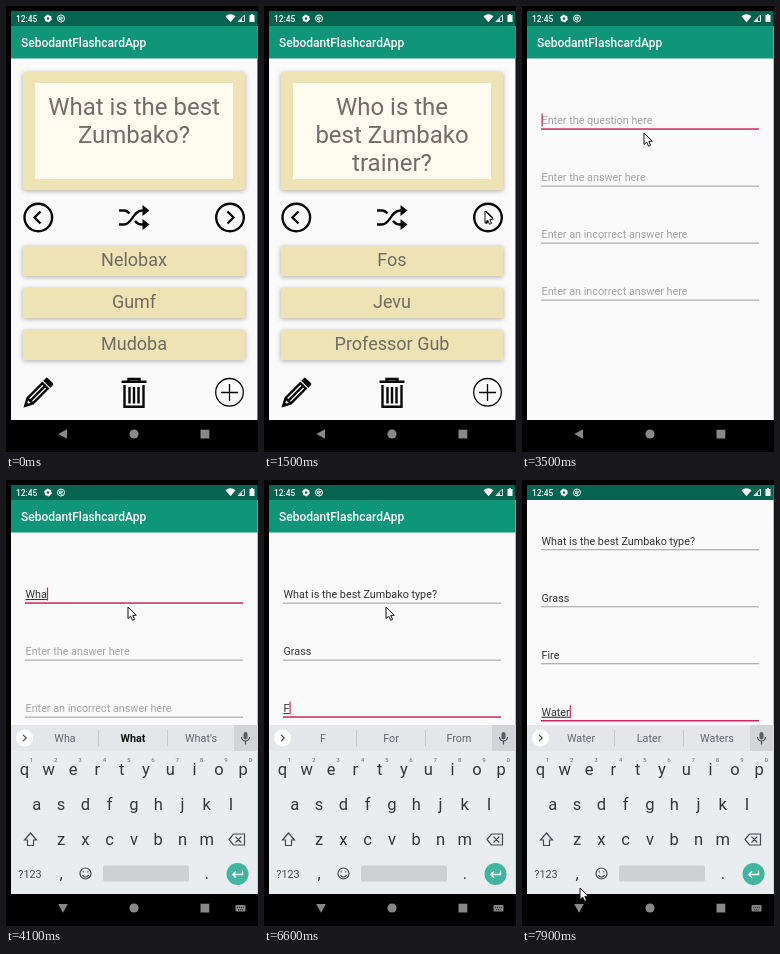
An HTML page for the animation above (8 s loop, 252x446 px).

```html
<!DOCTYPE html>
<html lang="en">
<head>
<meta charset="utf-8">
<title>Flashcards</title>
<style>
html, body { margin: 0; width: 100%; height: 100%; overflow: hidden; background: #000; }
svg { display: block; width: 252px; height: 446px; }
text { font-family: Roboto, sans-serif; white-space: pre; }
.mid { text-anchor: middle; }
.line { fill: none; stroke: #080808; stroke-width: 2.4; }
.card { fill: #ede3b5; filter: drop-shadow(0 1.5px 2.5px rgba(0, 0, 0, .32)); }
.question { font-size: 24px; fill: #716e69; }
.answer { font-size: 18px; fill: #716c60; }
.field { font-size: 10.8px; }
.key { font-size: 16.5px; fill: #33373a; }
.digit { font-size: 6.2px; fill: #666a6e; }
.glyph { fill: none; stroke: #45494d; stroke-width: 1.2; }
.nav { fill: #888; }
</style>
</head>
<body>
<svg viewBox="0 0 252 446">
  <defs>
    <clipPath id="screen"><rect x="5" y="5" width="246.500" height="409"/></clipPath>
    <g id="bar">
      <rect x="5" y="20" width="247" height="32.500" fill="#0f9577"/>
      <text x="15" y="41" font-size="12" font-weight="500" fill="#fff">SebodantFlashcardApp</text>
    </g>
  </defs>
  <rect width="252" height="446"/>
  <g clip-path="url(#screen)">
    <g id="deck">
      <rect x="5" y="20" width="247" height="394" fill="#fafafa"/>
      <use href="#bar"/>
      <rect class="card" x="17" y="66" width="222" height="118" rx="3"/>
      <rect x="29" y="77" width="198" height="96" fill="#fffbee"/>
      <g id="question"></g>
      <g id="answers"></g>
      <g class="line">
        <circle cx="32.300" cy="211.500" r="13.800"/>
        <path d="M34.500 205.500 28.500 211.500 34.500 217.500"/>
        <circle cx="224" cy="211.500" r="13.800"/>
        <path d="M221.500 205.500 227.500 211.500 221.500 217.500"/>
        <path d="M113 218.500h5c8 0 9-14 18-14h2M113 204.500h5c2 0 4 1.200 5.500 3M129 215c2 2.500 4 3.500 7 3.500h2"/>
      </g>
      <path d="M136.500 199l7 5.500-7 5.500zM136.500 213l7 5.500-7 5.500z" fill="#080808"/>
      <g transform="translate(32 387) rotate(-45)">
        <path class="line" d="M-18 0-11-3.800H10V3.800H-11ZM-11-3.800V3.800M-11 0H10"/>
        <path d="M-20 0-14.500-3V3ZM12.500-5H16q1.500 0 1.500 1.500V3.500Q17.500 5 16 5H12.500Z" fill="#080808"/>
      </g>
      <path class="line" d="M115.500 375.800H140.500M122.500 375V373H133.500V375M118.500 379V400.800H137.500V379M123.500 381V397.500M128 381V397.500M132.500 381V397.500"/>
      <g class="line" style="stroke-width:1.300">
        <circle cx="223.500" cy="386.300" r="13.800"/>
        <path d="M215 386.500H232M223.500 378V395"/>
      </g>
    </g>
    <g id="form">
      <g id="pan">
        <rect x="5" y="20" width="247" height="480" fill="#fafafa"/>
        <use href="#bar"/>
        <g id="fields"></g>
        <rect id="caret" width="1.200" height="13" fill="#d0265f"/>
      </g>
    </g>
    <g id="keyboard">
      <rect x="5" y="245" width="247" height="170" fill="#eaedf0"/>
      <rect x="5" y="245" width="247" height="26" fill="#e4e6e9"/>
      <rect x="228" y="245" width="24" height="26" fill="#d2d4d7"/>
      <path d="M92.500 250V266M161.500 250V266" stroke="#c6c9cc"/>
      <circle cx="18.500" cy="258" r="8.500" fill="#fff"/>
      <path class="glyph" d="M17 254.800 20.200 258 17 261.200"/>
      <rect x="237.500" y="252" width="4" height="7.500" rx="2" fill="#5b5f63"/>
      <path class="glyph" d="M235.500 257a4 4 0 0 0 8 0M239.500 261.500V264.500"/>
      <g id="words"></g>
      <g id="keys"></g>
      <path class="glyph" d="M24.500 353 18.500 360H21.500V365.500H27.500V360H30.500Z"/>
      <path class="glyph" d="M223 359.500 227.500 354H238.500V365H227.500ZM229.500 356.700 235.300 362.500M235.300 356.700 229.500 362.500"/>
      <circle class="glyph" cx="79.500" cy="393.500" r="5.500"/>
      <path class="glyph" d="M76.500 395a3.200 3.200 0 0 0 6 0M77.300 391.200V392.500M81.700 391.200V392.500"/>
      <rect x="97" y="385.500" width="86" height="16" rx="2" fill="#cdd0d3"/>
      <circle cx="231.500" cy="394" r="11" fill="#42b5a0"/>
      <path d="M236.500 390.500V394.500H227M230 391.300 226.800 394.500 230 397.700" fill="none" stroke="#fff" stroke-width="1.400"/>
    </g>
    <rect x="5" y="5" width="247" height="15" fill="#04644f"/>
    <g fill="#fff">
      <text x="10" y="15.500" font-size="8.400" font-weight="500">12:45</text>
      <circle cx="42" cy="12.500" r="2.300" fill="none" stroke="#fff" stroke-width="2"/>
      <circle cx="42" cy="12.500" r="3.400" fill="none" stroke="#fff" stroke-dasharray="1.780"/>
      <circle cx="55" cy="12.500" r="3.500" fill="none" stroke="#fff"/>
      <path d="M53.500 14V11.200H56.200V13H53.500L56.500 15" fill="none" stroke="#fff" stroke-width=".9"/>
      <path d="M219.500 10.200q5-4 10 0l-5 6zM236 12.200V16H232zM243.500 9h1.500V8h2v1h1.500v7h-5z"/>
      <path d="M238.500 9V15.500H232Z" fill="none" stroke="#fff" stroke-width=".9"/>
    </g>
  </g>
  <g class="nav">
    <path id="back" d="M52.300 428 61 423.200V432.800Z"/>
    <circle cx="128" cy="428" r="4.600"/>
    <rect x="194.500" y="423.700" width="8.800" height="8.800"/>
    <g id="switch">
      <rect x="229.500" y="425" width="10" height="6.500" rx="1"/>
      <path d="M231 427.300H238.500M232 429.800H237.500" stroke="#000" stroke-width=".8" stroke-dasharray="1.100 .8"/>
    </g>
  </g>
  <path id="pointer" d="M0 0V11.500L2.700 9.200 4.600 13.300 6.600 12.400 4.800 8.400 8.300 8.200Z" fill="#fff" stroke="#111" stroke-width="1"/>
</svg>
<script>
const LOOP = 8000, STEP = 100;
const $ = id => document.getElementById(id);
const text = (x, y, cls, s = '') => `<text x="${x}" y="${y}" class="${cls}">${s}</text>`;

const cards = [
  { ask: ['What is the best', 'Zumbako?'], options: ['Nelobax', 'Gumf', 'Mudoba'] },
  { ask: ['Who is the', 'best Zumbako', 'trainer?'], options: ['Fos', 'Jevu', 'Professor Gub'] }
];

// focus: when the field becomes active; first: time of the first letter; pace: ms per letter
const fields = [
  { value: 'What is the best Zumbako type?', hint: 'Enter the question here', focus: 3500, first: 3988, pace: 56 },
  { value: 'Grass', hint: 'Enter the answer here', focus: 5900, first: 6000, pace: 80 },
  { value: 'Fire', hint: 'Enter an incorrect answer here', focus: 6500, first: 6600, pace: 100 },
  { value: 'Water', hint: 'Enter an incorrect answer here', focus: 7100, first: 7300, pace: 90 }
];

// [time, suggestions, middle one is bold]
const hints = [
  [0, '||'], [4000, 'W|What|We', 1], [4100, "Wha|What|What's", 1], [4200, "What|What's|Whatever"],
  [4300, 'i|is|in', 1], [4400, 'the|it|your'], [4500, 'th|the|that', 1], [4600, 'the|they|then'],
  [4700, 'b|best|be'], [4800, 'bes|best|beat', 1], [4900, 'way|time|place'], [5000, 'Zu|Zumbako|Zip'],
  [5200, 'Zumba|Zumbako|Zoom'], [5400, 't|to|the'], [5500, 'typ|type|to', 1], [5600, 'type|types|typed'],
  [5700, '||'], [6000, 'G|Good|Go'], [6100, 'Gr|Great|Green'], [6200, 'Gras|Grass|Grab', 1],
  [6400, 'Grass|Grassy|Grasses'], [6500, '||'], [6600, 'F|For|From'], [6700, 'Fi|First|Find'],
  [6800, 'Fir|First|Fire'], [6900, 'Fire|Fired|Fires'], [7100, '||'], [7300, 'W|What|We'],
  [7400, 'Wa|Was|Want'], [7500, 'Wat|Water|Watch'], [7600, 'Wate|Water|Waters', 1], [7700, 'Water|Later|Waters']
];

const path = [
  [200, 253, 262], [700, 221, 205], [2300, 221, 205], [2800, 219, 380],
  [3200, 219, 380], [3500, 122, 127], [7600, 122, 127], [7900, 58, 408]
];

const ease = k => k * k * (3 - 2 * k);
const ramp = (t, from, to) => Math.min(1, Math.max(0, (t - from) / (to - from)));
const move = (id, x, y) => $(id).setAttribute('transform', `translate(${x} ${y})`);
const show = (id, on) => $(id).setAttribute('visibility', on ? 'visible' : 'hidden');

function build() {
  const rows = [['qwertyuiop', 18.5, 295], ['asdfghjkl', 30.7, 330], ['zxcvbnm', 55, 365]];
  $('keys').innerHTML = rows.map(([letters, x, y], r) => [...letters].map((c, i) =>
    text(x + i * 24.3, y, 'mid key', c) +
    (r ? '' : text(x + 7 + i * 24.3, 282, 'mid digit', (i + 1) % 10))).join('')).join('') +
    '<text x="24" y="397.500" class="mid" font-size="10.800" fill="#45494d">?123</text>' +
    text(55, 399, 'mid key', ',') + text(201, 399, 'mid key', '.');
  $('words').innerHTML = [59, 127, 195].map(x => text(x, 262, 'mid field')).join('');
  $('answers').innerHTML = [0, 1, 2].map(i =>
    `<rect class="card" x="17" y="${240 + 42 * i}" width="222" height="30"/>` +
    text(128, 259.5 + 42 * i, 'mid answer')).join('');
  $('fields').innerHTML = fields.map((f, i) =>
    text(19.5, 118 + 57 * i, 'field') + `<rect x="19" width="218"/>`).join('');
}

function drawDeck(t) {
  const card = cards[t < 1200 ? 0 : 1];
  $('question').innerHTML = card.ask.map((s, i) => text(128, 108.5 + 28 * i, 'mid question', s)).join('');
  $('answers').querySelectorAll('text').forEach((el, i) => { el.textContent = card.options[i]; });
}

function drawForm(t) {
  const open = ramp(t, 3100, 3400);
  $('form').setAttribute('opacity', open);
  move('form', 0, 24 * (1 - ease(open)));
  move('pan', 0, -53.3 * ease(ramp(t, 7000, 7300)));
  const active = fields.filter(f => t >= f.focus).length - 1;
  const lines = $('fields').querySelectorAll('rect');
  $('fields').querySelectorAll('text').forEach((el, i) => {
    const f = fields[i], on = i === active;
    const typed = f.value.slice(0, Math.max(0, Math.floor((t - f.first) / f.pace + 1.001)));
    const word = on ? typed.match(/\w*$/)[0] : '';
    el.innerHTML = typed
      ? typed.slice(0, typed.length - word.length) + `<tspan text-decoration="underline">${word}</tspan>`
      : f.hint;
    el.setAttribute('fill', typed ? '#333' : '#a3a3a3');
    lines[i].setAttribute('y', 122.7 + 57 * i - (on ? .4 : 0));
    lines[i].setAttribute('height', on ? 1.5 : .8);
    lines[i].setAttribute('fill', on ? '#d0265f' : '#858585');
    if (on) {
      $('caret').setAttribute('x', 19.5 + (typed ? el.getComputedTextLength() : 0));
      $('caret').setAttribute('y', 107.5 + 57 * i);
    }
  });
  show('caret', active >= 0);
}

function drawKeyboard(t) {
  const up = ramp(t, 3500, 3800);
  move('keyboard', 0, 170 * (1 - ease(up)));
  show('keyboard', up > 0);
  show('switch', up > 0);
  $('back').setAttribute('transform', up > 0 ? 'rotate(-90 57 428)' : '');
  const [, list, strong] = hints.filter(h => h[0] <= t).pop();
  const words = list.split('|');
  $('words').querySelectorAll('text').forEach((el, i) => {
    const bold = strong && i === 1;
    el.textContent = words[i];
    el.setAttribute('font-weight', bold ? 700 : 400);
    el.setAttribute('fill', bold ? '#111' : '#63676b');
  });
}

function drawPointer(t) {
  show('pointer', t >= path[0][0]);
  const i = Math.max(1, path.findIndex(p => p[0] >= t));
  const [a, b] = t >= path[path.length - 1][0] ? path.slice(-2) : [path[i - 1], path[i]];
  const k = ease(ramp(t, a[0], b[0]));
  move('pointer', a[1] + (b[1] - a[1]) * k, a[2] + (b[2] - a[2]) * k);
}

let last = -1;
function render(now) {
  const t = Math.floor((now - start) % LOOP / STEP) * STEP;
  if (t !== last) {
    last = t;
    drawDeck(t);
    drawForm(t);
    drawKeyboard(t);
    drawPointer(t);
  }
  requestAnimationFrame(() => render(performance.now()));
}

build();
const start = performance.now();
render(start);
</script>
</body>
</html>
```
